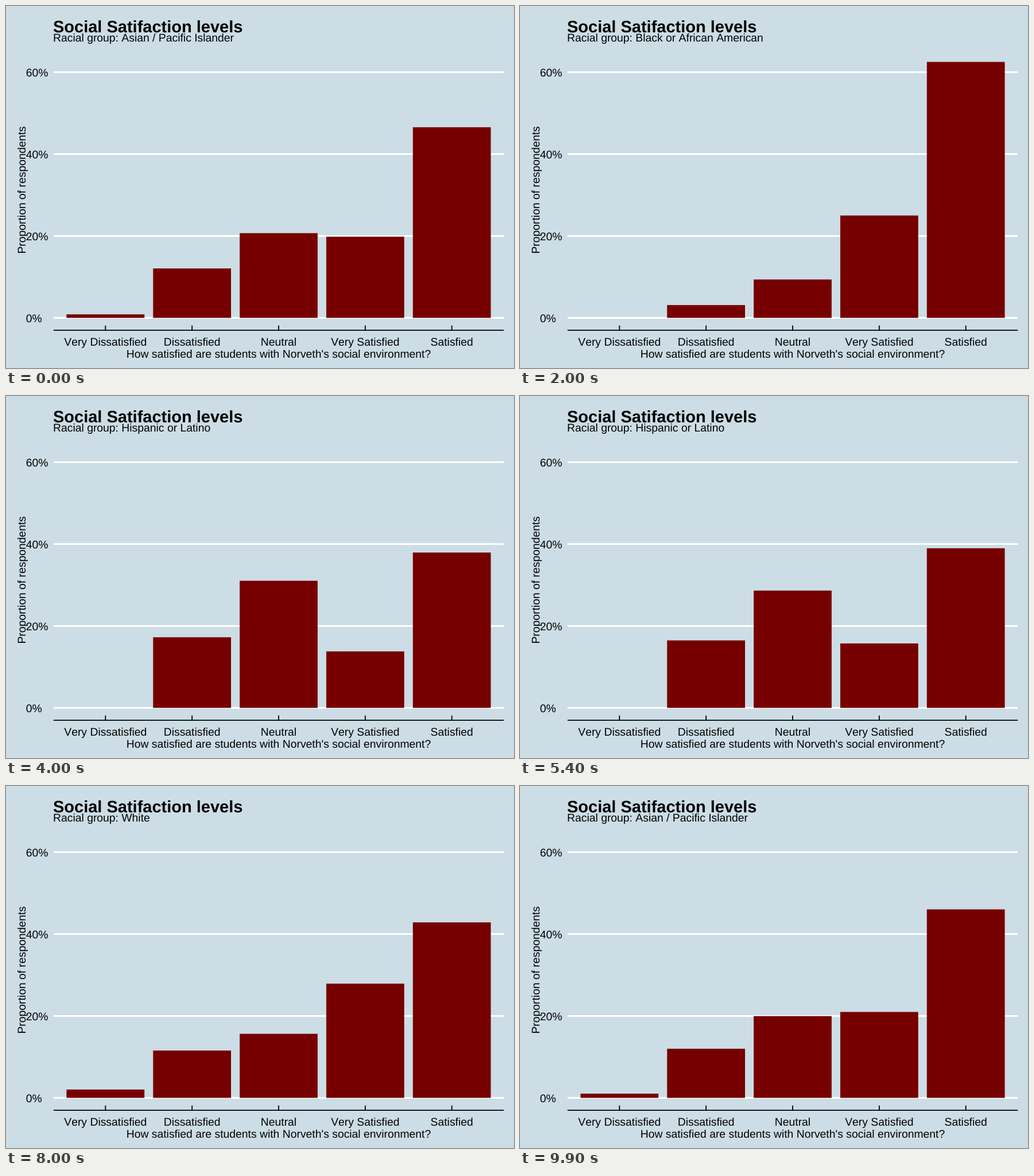
An HTML page that plays this animation: 885x632 px, repeating every 10 s.

```html
<!DOCTYPE html>
<html lang="en">
<head>
<meta charset="utf-8">
<title>Social satisfaction levels</title>
<style>
  html, body { margin: 0; width: 100%; height: 100%; overflow: hidden; background: #ccdde5; }
  svg { display: block; width: 100%; height: 100%; }
  text {
    font: 19.35px "Liberation Sans", Arial, sans-serif;
    font-kerning: none;
    text-rendering: geometricPrecision;
  }
  .title { font-size: 29px; font-weight: bold; }
  .mid { text-anchor: middle; }
  .grid { stroke: #fff; stroke-width: 3.2; }
  .axis { stroke: #000; stroke-width: 1.8; }
  .bar { fill: #760000; }
</style>
</head>
<body>
<svg id="chart" viewBox="0 0 885 632"></svg>
<script>
const chart = document.getElementById('chart');
const LEFT = 82.8, RIGHT = 867.2, ZERO = 544.5, PER_CENT = 7.15;
const STEP = (RIGHT - LEFT) / 5.2, BAR = STEP * 0.9;
const HOLD = 2000, TICK = 100, TWEEN_STEPS = 7;

const levels = ['Very Dissatisfied', 'Dissatisfied', 'Neutral', 'Very Satisfied', 'Satisfied'];
// Answers per level, in the order of the levels.
const groups = [
  { name: 'Asian / Pacific Islander', counts: [1, 14, 24, 23, 54] },
  { name: 'Black or African American', counts: [0, 1, 3, 8, 20] },
  { name: 'Hispanic or Latino', counts: [0, 5, 9, 4, 11] },
  { name: 'Other', counts: [1, 10, 12, 23, 38] },
  { name: 'White', counts: [3, 17, 23, 41, 63] }
];
for (const g of groups) {
  const total = g.counts.reduce((a, b) => a + b);
  g.share = g.counts.map(n => 100 * n / total);
}

function add(tag, attrs, label) {
  const el = document.createElementNS(chart.namespaceURI, tag);
  for (const key in attrs) el.setAttribute(key, attrs[key]);
  if (label) el.textContent = label;
  chart.appendChild(el);
  return el;
}
const line = (x1, y1, x2, y2, cls) => add('line', { x1, y1, x2, y2, class: cls });
const text = (x, y, label, cls = '') => add('text', { x, y, class: cls }, label);
const centre = i => LEFT + STEP * (i + 0.6);

for (let p = 0; p <= 60; p += 20) {
  const y = ZERO - p * PER_CENT;
  line(LEFT, y, RIGHT, y, 'grid');
  text(34.7, y + 7, p + '%');
}
const bars = levels.map((_, i) =>
  add('rect', { x: centre(i) - BAR / 2, width: BAR, class: 'bar' }));

line(LEFT, 566.2, RIGHT, 566.2, 'axis');
levels.forEach((label, i) => {
  line(centre(i), 557.8, centre(i), 566.2, 'axis');
  text(centre(i), 593, label, 'mid');
});
text(475, 613.5, "How satisfied are students with Norveth's social environment?", 'mid');
text(0, 0, 'Proportion of respondents', 'mid')
  .setAttribute('transform', 'translate(33.5 321.3) rotate(-90)');
text(82, 45.7, 'Social Satifaction levels', 'title');
const subtitle = text(82, 62, '');

function draw(ms) {
  const t = ms % (HOLD * groups.length);
  const index = Math.floor(t / HOLD);
  const from = groups[index], to = groups[(index + 1) % groups.length];
  const k = Math.max(0, Math.floor(t % HOLD / TICK) - 13);
  const mix = k / TWEEN_STEPS;

  bars.forEach((bar, i) => {
    const a = from.share[i], b = to.share[i];
    // A level without answers has no bar until its next group is fully shown.
    const share = k && !(a && b) ? 0 : a + (b - a) * mix;
    bar.setAttribute('y', ZERO - share * PER_CENT);
    bar.setAttribute('height', share * PER_CENT);
  });
  subtitle.textContent = 'Racial group: ' + (mix < 0.5 ? from : to).name;
}

const start = performance.now();
function loop() {
  draw(performance.now() - start);
  requestAnimationFrame(loop);
}
loop();
</script>
</body>
</html>
```
